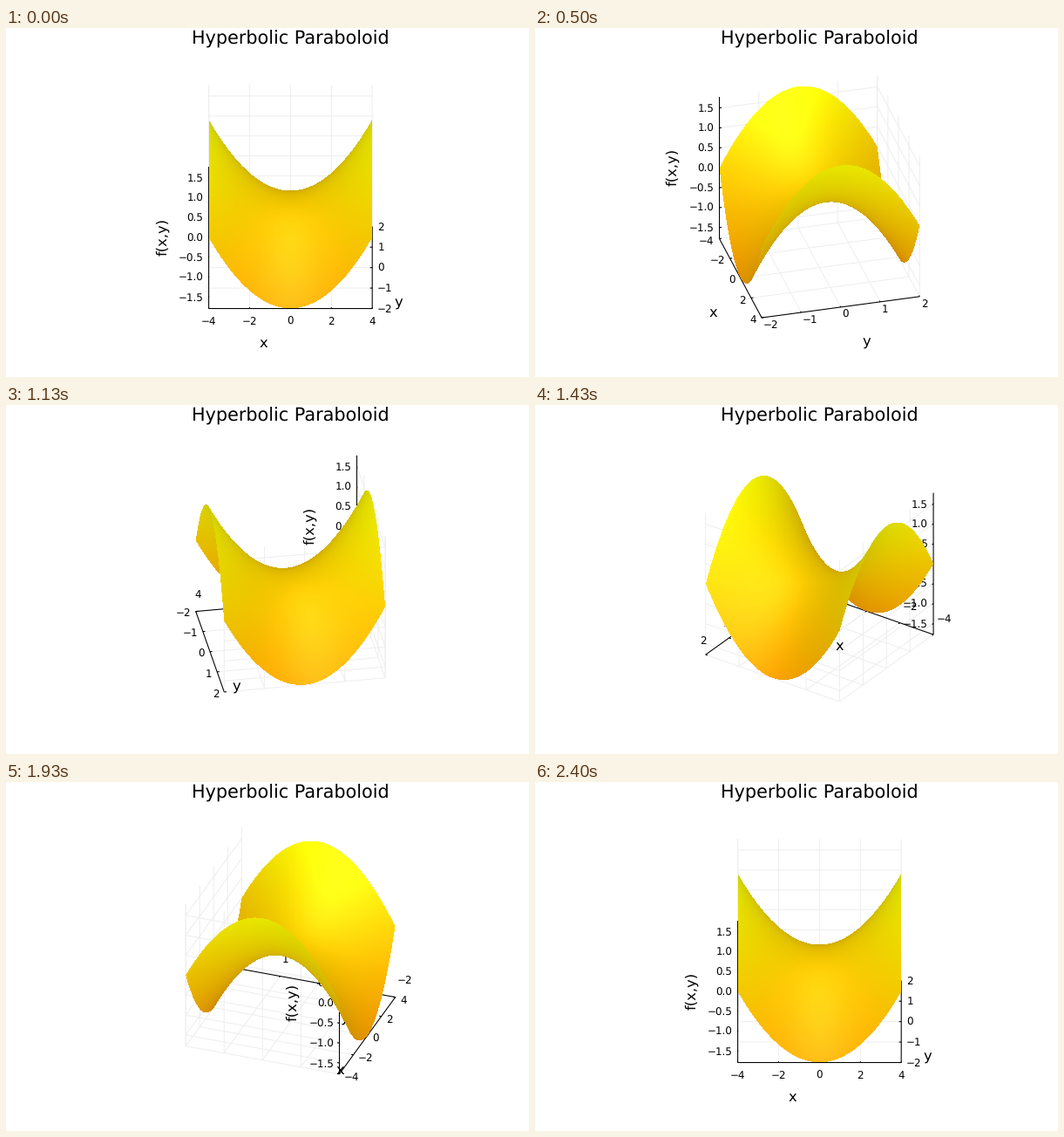
Recreate the animation shown at these times as a matplotlib script. Size 600 by 400 pixels, loop 2430 ms.

```python
import math

import numpy as np
import matplotlib.pyplot as plt
from matplotlib.animation import FuncAnimation
from matplotlib.collections import LineCollection

plt.rcParams.update({
    "font.family": "DejaVu Sans",
    "text.hinting": "none",
    "path.simplify": False,
})

W, H = 600, 400
CX, CY = 326.4, 193.4           # centre of the plot box on the stage
SIDE = 187.6                    # edge of the plot box in pixels
SIN_E, COS_E = 0.5, math.sqrt(0.75)   # camera elevation of 30 degrees
LOOP, TICK = 2430, 10           # ms
Z_SPAN = 32 / 9                 # z = x^2/9 - y^2/2.25 on [-4,4] x [-2,2]

TITLE_SIZE, LABEL_SIZE, TICK_SIZE = 14.93, 11.75, 8.55
HALF_DIGIT = 4.3                # from digit centre down to the baseline


def project(points, s, c):
    """Box coordinates in [-0.5, 0.5] to stage pixels (orthographic)."""
    u, v, w = np.moveaxis(np.asarray(points, float), -1, 0)
    near = u * s - v * c
    x = CX + SIDE * (u * c + v * s)
    y = CY + SIDE * (near * SIN_E - w * COS_E)
    return np.stack([x, y], axis=-1)


def number(value, digits):
    return f"{value:.{digits}f}".replace("-", "\u2212")


# Ticks as (box position, text)
x_ticks = [(x / 8, number(x, 0)) for x in range(-4, 5, 2)]
y_ticks = [(y / 4, number(y, 0)) for y in range(-2, 3)]
z_ticks = [(z / Z_SPAN, number(z, 1)) for z in np.arange(-1.5, 1.6, 0.5)]

LO, HI, T = -0.5, 0.5, 0.014

grid, strokes = [], []
for u, _ in x_ticks:
    grid += [[(u, LO, LO), (u, HI, LO)], [(u, HI, LO), (u, HI, HI)]]
    strokes.append([(u, LO, LO), (u, LO + T, LO)])
for v, _ in y_ticks:
    grid += [[(HI, v, LO), (LO, v, LO)], [(LO, v, LO), (LO, v, HI)]]
    strokes.append([(HI, v, LO), (HI - T, v, LO)])
for w, _ in z_ticks:
    grid += [[(LO, LO, w), (LO, HI, w)], [(LO, HI, w), (HI, HI, w)]]
    strokes.append([(LO, LO, w), (LO, LO + T, w)])
strokes += [
    [(LO, LO, LO), (HI, LO, LO)],
    [(HI, LO, LO), (HI, HI, LO)],
    [(LO, LO, LO), (LO, LO, HI)],
]

# Dense samples of the surface
N = 1100
side = np.linspace(-0.499, 0.499, N, dtype=np.float32)


def render_surface(s, c):
    """Paint the samples from far to near, then shade what stays visible."""
    u = side if s >= 0 else side[::-1]
    v = side[::-1] if c >= 0 else side
    x = CX + SIDE * (u[:, None] * c + v[None, :] * s)
    y = (CY + SIDE * ((u * s * SIN_E - 2 * u**2 * COS_E)[:, None]
                      + (2 * v**2 * COS_E - v * c * SIN_E)[None, :]))

    # A pixel is covered only by samples close to its centre
    col, row = np.floor(x), np.floor(y)
    central = (np.abs(x - col - 0.5) < 0.2) & (np.abs(y - row - 0.5) < 0.2)
    hits = np.flatnonzero(central)
    pixel = row.ravel()[hits].astype(int) * W + col.ravel()[hits].astype(int)
    top = np.full(W * H, -1)
    top[pixel] = hits

    seen = np.flatnonzero(top >= 0)
    pu, pv = u[top[seen] // N], v[top[seen] % N]
    height = 2 * (pu**2 - pv**2) + 0.5
    facing = np.abs(-4 * pu * s * COS_E - 4 * pv * c * COS_E + SIN_E)
    facing /= np.sqrt(16 * pu**2 + 16 * pv**2 + 1)

    light = 0.8 + 0.2 * facing
    shine = 0.1 * facing**10
    red = light + shine
    green = (165 + 90 * height) / 255 * light + shine
    rgb = np.stack([red, green, shine], axis=-1)
    image = np.zeros((W * H, 4), np.uint8)
    image[seen, :3] = np.clip(rgb, 0, 1) * 255 + 0.5
    image[seen, 3] = 255
    return image.reshape(H, W, 4)


def tick_offset(s, c):
    """Alignment and shift of tick labels for an axis seen at this angle."""
    if abs(s) < 1e-9:
        return "center", 0, 14 if c > 0 else -20.5
    if c > -1e-9:
        return ("right" if s > 0 else "left"), -6 * s, 7.8 * c
    return "left", -(8 if s > 0 else 6) * s, 7.8 * c - 12.4


fig = plt.figure(figsize=(W / 100, H / 100), dpi=100, facecolor="white")
ax = fig.add_axes([0, 0, 1, 1])
surface = ax.imshow(np.zeros((H, W, 4), np.uint8), extent=(0, W, H, 0),
                    interpolation="nearest", aspect="auto", zorder=5)
ax.set(xlim=(0, W), ylim=(H, 0))
ax.axis("off")


def add_lines(color, width, zorder):
    lines = LineCollection([], colors=color, linewidths=width, zorder=zorder)
    lines.set_snap(False)
    return ax.add_collection(lines, autolim=False)


grid_lines = add_lines("#eeeeee", 0.72, 1)
axis_lines = add_lines("black", 0.76, 2)


def text(content, size, **kw):
    kw = {"ha": "center", "va": "baseline", **kw}
    return ax.text(0, 0, content, fontsize=size, color="black", zorder=3, **kw)


text("Hyperbolic Paraboloid", TITLE_SIZE).set_position((CX + 0.4, 18.5))
x_name = text("x", LABEL_SIZE)
y_name = text("y", LABEL_SIZE)
z_name = text("f(x,y)", LABEL_SIZE, va="center", rotation=90)
x_labels = [((u, LO, LO), text(t, TICK_SIZE)) for u, t in x_ticks]
y_labels = [((HI, v, LO), text(t, TICK_SIZE)) for v, t in y_ticks]
z_labels = [((LO, LO, w), text(t, TICK_SIZE)) for w, t in z_ticks]


def place(label, point, dx, dy, s, c):
    x, y = project(point, s, c)
    label.set_position((x + dx, y + dy))


def place_ticks(labels, offset, s, c):
    align, dx, dy = offset
    for point, label in labels:
        label.set_ha(align)
        place(label, point, dx, dy + HALF_DIGIT, s, c)


shown = {"step": None}


def update(frame):
    # 30 camera steps per second on a 10 ms clock
    step = (3 * frame + 1) // 10
    if step == shown["step"]:
        return
    shown["step"] = step

    azimuth = math.radians(5 * step % 360)
    s, c = math.sin(azimuth), math.cos(azimuth)
    grid_lines.set_segments(project(grid, s, c))
    axis_lines.set_segments(project(strokes, s, c))
    surface.set_data(render_surface(s, c))

    # The y axis behaves like the x axis a quarter turn earlier
    place_ticks(x_labels, tick_offset(s, c), s, c)
    place_ticks(y_labels, tick_offset(-c, s), s, c)
    place_ticks(z_labels, ("right", -6, 0), s, c)
    place(x_name, (0, LO, LO), -31.2, 44.7, s, c)
    place(y_name, (HI, 0, LO), 30.1, 44.7, s, c)
    place(z_name, (LO, LO, 0), -53.2, -0.8, s, c)


anim = FuncAnimation(fig, update, frames=LOOP // TICK, interval=TICK,
                     repeat=True, repeat_delay=0, blit=False)
plt.show()
```
